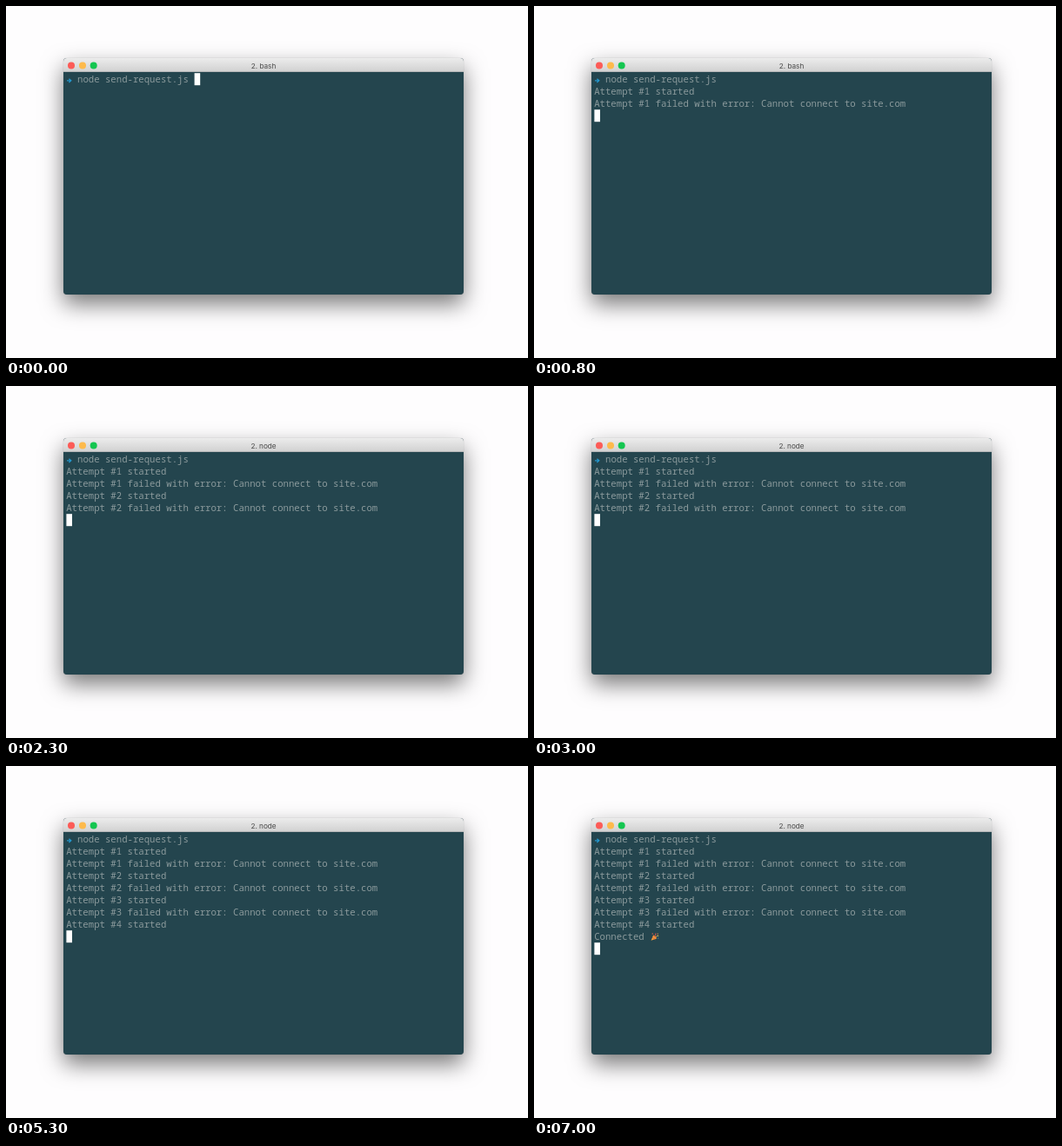
An HTML page that plays this animation: 600 px wide and 405 px high, repeating every 7100 ms.

```html
<!DOCTYPE html>
<html lang="en">
<head>
<meta charset="utf-8">
<title>Retry demo</title>
<style>
  html, body { margin: 0; width: 100%; height: 100%; overflow: hidden; background: #fefdfe; }
  #window {
    position: absolute; left: 66px; top: 60px; width: 460px; height: 272px;
    border-radius: 4px; background: #24454e;
    box-shadow: 0 11px 26px rgba(0, 0, 0, .52), 0 0 1px rgba(0, 0, 0, .35);
  }
  #bar {
    height: 15px; border-bottom: 1px solid #b5b7b8; border-radius: 4px 4px 0 0;
    background: linear-gradient(#ececec, #d2d2d2);
  }
  svg { position: absolute; left: 0; top: 0; display: block; }
  .term { font: 500 10.66px "Noto Sans Mono", "DejaVu Sans Mono", monospace; fill: #8b9a9c; white-space: pre; }
  #title { font: 8.2px Inter, "Open Sans", sans-serif; fill: #484848; text-anchor: middle; }
</style>
</head>
<body>
<div id="window"><div id="bar"></div></div>
<svg width="600" height="405" viewBox="0 0 600 405">
  <circle cx="75" cy="68.5" r="4" fill="#fc5b57"/>
  <circle cx="88" cy="68.5" r="4" fill="#fdba4b"/>
  <circle cx="100.7" cy="68.5" r="4" fill="#14c650"/>
  <text id="title" x="296" y="71.6"></text>
  <path d="M70 85.8h4.4M72.4 83.7l2.4 2.1-2.4 2.1" fill="none" stroke="#2496cc" stroke-width="1.3"/>
  <g id="lines" class="term"></g>
  <g id="popper">
    <path d="M134.6 200.8l2.5-6.3q3.2 1 4 4z" fill="#f2a03d"/>
    <path d="M136.2 197l3.2 2.7M137.1 194.8l3.6 3.2" stroke="#d9583b" stroke-width=".9"/>
    <path d="M138.8 195.6q1.7-1 .9-3.1" fill="none" stroke="#e0524c" stroke-width="1.1"/>
    <path d="M140.2 196.6q1-1.6 3-1.2" fill="none" stroke="#e8c15a" stroke-width="1"/>
    <circle cx="136.2" cy="193" r=".7" fill="#dd6a55"/>
    <circle cx="142.2" cy="193.2" r=".7" fill="#d98a4a"/>
    <circle cx="142.7" cy="198" r=".6" fill="#5c9bc0"/>
  </g>
  <rect id="cursor" width="6.6" height="14" fill="#fff"/>
</svg>
<script>
  const LOOP = 7100, LEFT = 69.2, TOP = 77, PITCH = 14, COL = 6.4;
  const NODE_AT = 1900;
  const $ = id => document.getElementById(id);

  const started = n => `Attempt #${n} started`;
  const failed = n => `Attempt #${n} failed with error: Cannot connect to site.com`;
  const output = ["  node send-request.js"];
  for (const n of [1, 2, 3]) output.push(started(n), failed(n));
  output.push(started(4), "Connected");

  // [time in ms, visible lines, cursor column]
  const steps = [
    [0, 1, 23], [300, 1, 0], [800, 3, 0], [2300, 5, 0],
    [3800, 7, 0], [5300, 8, 0], [5800, 9, 0]
  ];

  const rows = output.map((text, i) => {
    const row = document.createElementNS("http://www.w3.org/2000/svg", "text");
    const indent = text.length - text.trimStart().length;
    row.setAttribute("x", LEFT + indent * COL);
    row.setAttribute("y", TOP + 11.4 + i * PITCH);
    row.textContent = text.trim();
    return $("lines").appendChild(row);
  });

  const show = (el, on) => el.setAttribute("visibility", on ? "visible" : "hidden");

  function draw(t) {
    const [, count, col] = steps.filter(s => s[0] <= t).pop();
    rows.forEach((row, i) => show(row, i < count));
    show($("popper"), count === output.length);
    const line = col ? 0 : count;
    $("cursor").setAttribute("x", LEFT + .2 + col * COL);
    $("cursor").setAttribute("y", TOP + .2 + line * PITCH);
    $("title").textContent = t < NODE_AT ? "2. bash" : "2. node";
  }

  const start = performance.now();
  function tick() {
    draw((performance.now() - start) % LOOP);
    requestAnimationFrame(tick);
  }
  tick();
</script>
</body>
</html>
```
